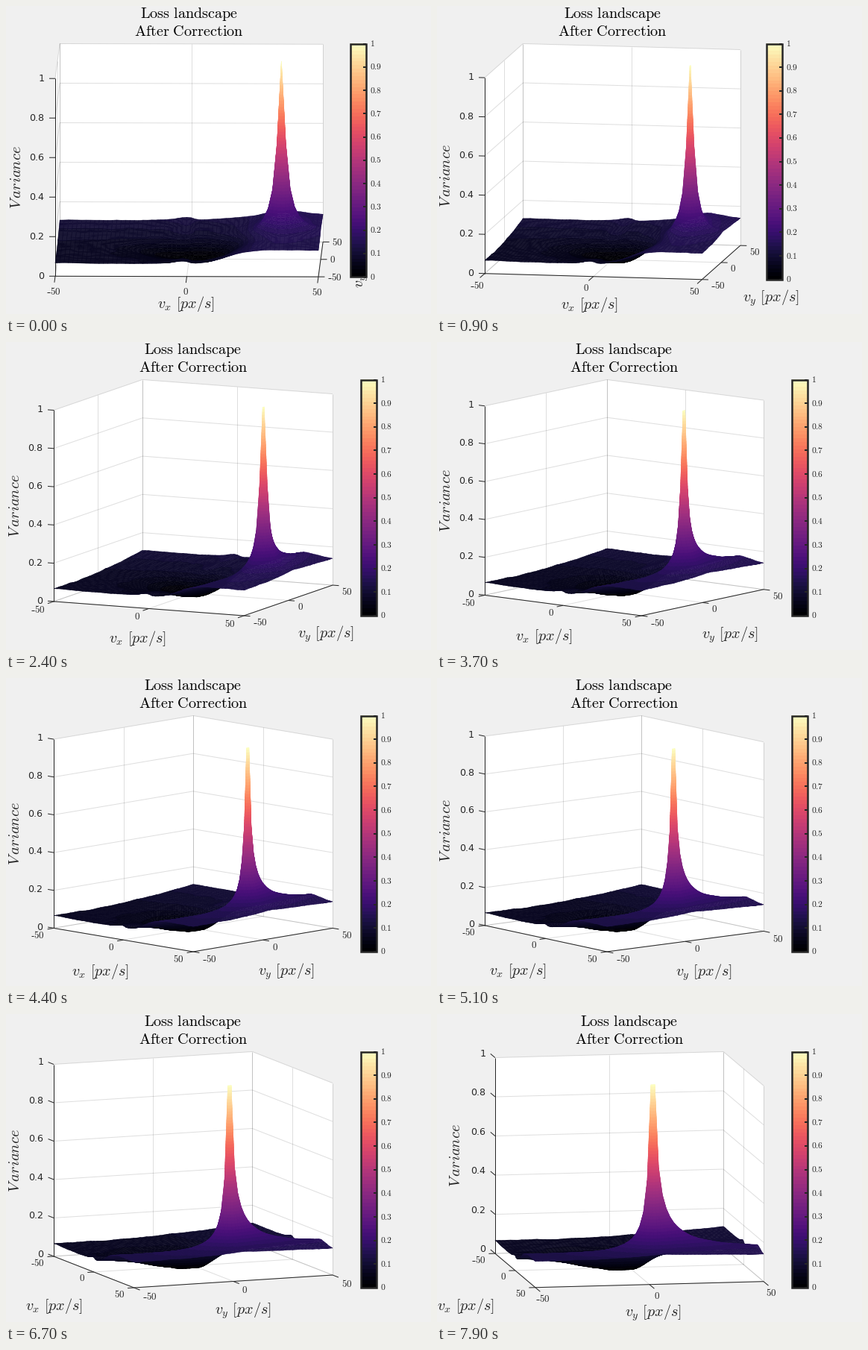
A matplotlib script that plays this animation: 570 px wide and 413 px high, repeating every 8 s.

```python
import numpy as np
import matplotlib.pyplot as plt
from matplotlib.animation import FuncAnimation
from matplotlib.collections import LineCollection, PolyCollection
from matplotlib.patches import Polygon, Rectangle

W, H, DPI = 570, 413, 64
PT = 72 / DPI          # points per pixel
FRAMES = 80
LEVELS = 64
INK = "#262626"
TILT = np.tan(np.radians(10))

plt.rcParams["mathtext.fontset"] = "cm"
cmap = plt.get_cmap("magma", LEVELS)


# ---------- surface ----------

def bump(t, centre, below, above):
    """Bell curve with its own width on each side."""
    return np.exp(-((t - centre) / np.where(t < centre, below, above)) ** 2)


def step(t, centre, width):
    return .5 + .5 * np.tanh((t - centre) / width)


def roughness(shape, size):
    noise = np.random.default_rng(4).normal(0, size, shape)
    for axis in (0, 1):
        noise = sum(np.roll(noise, k, axis) for k in range(-2, 3)) / 5
    return noise


def make_surface(n=61):
    g = np.linspace(0, 1, n)
    u, v = np.meshgrid(g, g, indexing="ij")

    shelf = step(u, .65 + .12 * v, .08)
    z = .064 + .042 * v ** 2.5 * (1 - shelf) + .061 * shelf
    z += .012 * bump(u, .49, .05, .02)
    z -= .085 * bump(u, .55, .22, .15) * bump(v, .49, .28, .1)

    # sharp peak with a flat top along y
    dx = np.abs(100 * u - 85)
    dy = 100 * v - 50 - 25 / 6
    away = np.maximum(np.abs(dy) - .84, 0)
    fall_y = np.where(dy > 0, (away / 1.75) ** .94, (away / 1.35) ** 1.2)
    z += .87 / (1 + (dx / 1.75) ** 1.63 + fall_y)

    return g, np.clip(z + roughness(z.shape, .005), .001, 1)


def clip(poly, level, sign):
    out = []
    for p, q in zip(poly, poly[1:] + poly[:1]):
        a, b = sign * (p[2] - level), sign * (q[2] - level)
        if a >= 0:
            out.append(p)
        if a * b < 0:
            out.append(p + (q - p) * a / (a - b))
    return out


def slice_cells(g, z):
    """Cut each cell along the colour levels."""
    polys, bands, centres = [], [], []
    for i in range(len(g) - 1):
        for j in range(len(g) - 1):
            cell = [np.array([g[a], g[b], z[a, b]])
                    for a, b in ((i, j), (i + 1, j), (i + 1, j + 1), (i, j + 1))]
            heights = [p[2] for p in cell]
            lo = min(int(min(heights) * LEVELS), LEVELS - 1)
            hi = min(int(max(heights) * LEVELS), LEVELS - 1)
            for band in range(lo, hi + 1):
                piece = cell
                if band > lo:
                    piece = clip(piece, band / LEVELS, 1)
                if band < hi:
                    piece = clip(piece, (band + 1) / LEVELS, -1)
                if len(piece) < 3:
                    continue
                polys.append(piece + [piece[-1]] * (8 - len(piece)))
                bands.append(band)
                centres.append((g[i] + g[i + 1], g[j] + g[j + 1]))
    return np.array(polys), cmap(np.array(bands)), np.array(centres)


pieces, colours, centres = slice_cells(*make_surface())


# ---------- view ----------

def label_shift(deg):
    """Offset of an axis label from the middle of its axis."""
    return .5 * deg + .0042 * deg ** 2, 36.5 + .135 * deg


class View:
    """Orthographic camera, stretched to fill the space the labels leave."""

    def __init__(self, n):
        self.deg = n + 1
        a = np.radians(self.deg)
        s, c = self.s, self.c = np.sin(a), np.cos(a)
        p, q = c / (s + c), s / (s + c)
        self.flat = n < 3      # y label stands upright

        reach = 64 if self.flat else label_shift(90 - self.deg)[0] + 38
        right = min(438, (486 - reach - 32 * q) / (1 - q / 2))
        left = max(66 if self.flat else 64,
                   (38 + label_shift(self.deg)[0] - right * p / 2) / (1 - p / 2))
        self.left, self.right, self.top = left, right, 50.5
        self.bottom = min(367, 362.7 + 23.2 * min(s, c))
        self.height = (self.bottom - self.top) / (1 + TILT * (s + c))
        k = TILT * self.height
        self.eu = np.array([(right - left) * p, k * s])
        self.ev = np.array([(right - left) * q, -k * c])
        self.origin = np.array([left, self.bottom - k * s])

    def __call__(self, pts):
        pts = np.asarray(pts, float)
        xy = self.origin + pts[..., :1] * self.eu + pts[..., 1:2] * self.ev
        xy[..., 1] -= self.height * pts[..., 2]
        return xy


# ---------- artists ----------

fig = plt.figure(figsize=(W / DPI, H / DPI), dpi=DPI, facecolor="#f0f0f0")
ax = fig.add_axes([0, 0, 1, 1])
ax.axis("off")

bar = ax.imshow(np.arange(LEVELS)[::-1, None], cmap=cmap, aspect="auto",
                interpolation="nearest", extent=(0, 1, 1, 0), zorder=6)
ax.set_autoscale_on(False)


def text(s, size, **kw):
    kw = {"ha": "center", "va": "center", "color": INK, "zorder": 5, **kw}
    return ax.text(0, 0, s, fontsize=size * PT, **kw)


def lines(width, z, **kw):
    return ax.add_collection(LineCollection([], linewidths=width * PT, zorder=z, colors=INK, **kw),
                             autolim=False)


walls = ax.add_patch(Polygon([(0, 0), (1, 1), (0, 1)], fc="white", ec="none", zorder=1))
grid = lines(1, 2, alpha=.15)
axes_lines = lines(1, 3)
surface = ax.add_collection(PolyCollection([], linewidths=.5 * PT, zorder=4), autolim=False)
frame = ax.add_patch(Rectangle((0, 0), 1, 1, fill=False, ec=INK, lw=2.5 * PT, zorder=7))
bar_ticks = lines(2, 7)
hyphens = lines(1, 5)

titles = [text(r"$\mathrm{%s}$" % s, 20.2, va="baseline", color="black")
          for s in (r"Loss\ landscape", r"After\ Correction")]
x_label = text(r"$v_x\ [px/s]$", 20.2)
y_label = text(r"$v_y\ [px/s]$", 20.2)
z_label = text(r"$V\,ariance$", 20.5, rotation=90)

TICKS = ["-50", "0", "50"]
x_ticks, y_ticks = ([text(r"$\mathrm{%s}$" % t.strip("-"), 13) for t in TICKS]
                    for _ in range(2))
Z_VALUES = np.linspace(0, 1, 6)
z_ticks = [text(f"{z:.1g}", 12.6, ha="right", family="DejaVu Sans") for z in Z_VALUES]
BAR_VALUES = np.linspace(0, 1, 11)
bar_labels = [text(r"$\mathrm{%.1g}$" % b, 11.5, ha="left") for b in BAR_VALUES]

HALVES = (0, .5, 1)
GRID = [seg for z in Z_VALUES for seg in (((0, 0, z), (0, 1, z)), ((0, 1, z), (1, 1, z)))]
for t in HALVES:
    GRID += [((t, 1, 0), (t, 1, 1)), ((0, t, 0), (0, t, 1)),
             ((t, 0, 0), (t, 1, 0)), ((0, t, 0), (1, t, 0))]
HULL = [(0, 0, 0), (1, 0, 0), (1, 1, 0), (1, 1, 1), (0, 1, 1), (0, 0, 1)]
AXES = [((0, 0, 0), (0, 0, 1)), ((0, 0, 0), (1, 0, 0)), ((1, 0, 0), (1, 1, 0))]


def put_ticks(labels, starts, way, dashes):
    """Place three tick labels; returns the tick segments."""
    segs = []
    for label, name, start in zip(labels, TICKS, starts):
        end = start + 8.5 * way
        segs.append((start, end))
        minus = name[0] == "-"
        width = 6.5 * len(name.strip("-")) + 4.5 * minus
        if way[1] < .5:
            x = end[0] + np.sign(way[0]) * (4.5 + width / 2)
            y = end[1] + (.5 if way[1] < .009 else 8.5)
        else:
            x = end[0] + 5 * way[0]
            y = end[1] + 8.5 + 4 * way[1] ** 2
        label.set_position((x + 2.3 * minus, y))
        if minus:
            dashes.append(((x - width / 2, y + 1), (x - width / 2 + 3.8, y + 1)))
    return segs


def draw(n):
    cam = View(n)
    walls.set_xy(cam(HULL))
    grid.set_segments(cam(GRID))

    # far cells first
    order = np.argsort(cam.s * centres[:, 0] - cam.c * centres[:, 1], kind="stable")
    surface.set_verts(cam(pieces[order]))
    surface.set_facecolor(colours[order])
    surface.set_edgecolor(colours[order])

    dashes = []
    x_way = cam.eu / np.hypot(*cam.eu)
    y_way = -cam.ev / np.hypot(*cam.ev)
    segs = list(cam(AXES))
    segs += put_ticks(x_ticks, cam([(t, 0, 0) for t in HALVES]), y_way, dashes)
    segs += put_ticks(y_ticks, cam([(1, t, 0) for t in HALVES]), x_way, dashes)
    for label, z in zip(z_ticks, Z_VALUES):
        start = cam((0, 0, z))
        end = start - 8 * x_way
        segs.append((start, end))
        label.set_position(end - (6.5, 0))
    axes_lines.set_segments(segs)
    hyphens.set_segments(dashes)

    mid = (cam.left + cam.right) / 2
    for title, y in zip(titles, (15.5, 39.5)):
        title.set_position((mid, y))
    dx, dy = label_shift(cam.deg)
    x_label.set_position(cam((.5, 0, 0)) + (-dx, dy))
    y_label.set_rotation(90 if cam.flat else 0)
    y_label.set_position(cam((1, .5, 0)) + ((53, 0) if cam.flat else label_shift(90 - cam.deg)))
    z_label.set_position(cam((0, 0, .5)) - (52.5, 0))

    x0 = 476 + 1.1 * (cam.right - 438)
    x1 = x0 + 21
    bar.set_extent((x0, x1, cam.bottom, cam.top))
    ax.set(xlim=(0, W), ylim=(H, 0))
    frame.set_bounds(x0, cam.top, x1 - x0, cam.bottom - cam.top)
    ys = cam.bottom + BAR_VALUES * (cam.top - cam.bottom)
    bar_ticks.set_segments([((x1 - 4, y), (x1, y)) for y in ys])
    for label, y in zip(bar_labels, ys):
        label.set_position((x1 + 5, y))
    return []


anim = FuncAnimation(fig, draw, frames=FRAMES, interval=100, repeat=True,
                     repeat_delay=0, cache_frame_data=False)
plt.show()
```
